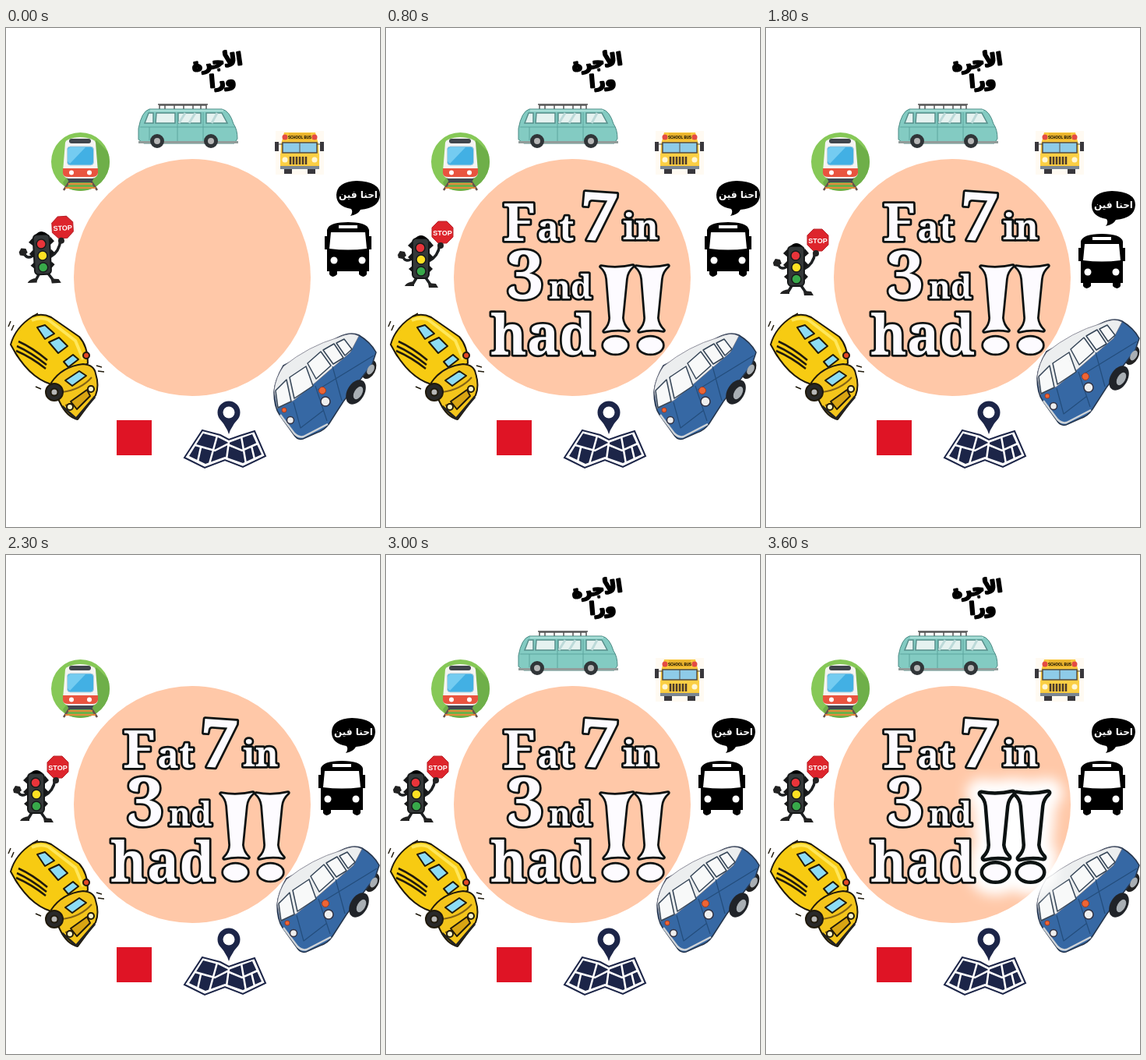
Write an HTML page that moves like this. It is 480 px wide and 640 px high and loops after 5600 ms.

```html
<!DOCTYPE html>
<html lang="en">
<head>
<meta charset="utf-8">
<title>Fat7in 3nd had!!</title>
<style>
html, body { margin: 0; width: 100%; height: 100%; overflow: hidden; background: #fff; }
svg { display: block; width: 100vw; height: 100vh; }
#title { --ink: #fdfbff; fill: var(--ink); stroke: #0c1212; stroke-width: 5.5; stroke-linejoin: round;
  paint-order: stroke; font-family: "Noto Serif", "Liberation Serif", serif; font-weight: 900; }
.arabic { font-family: "DejaVu Sans", sans-serif; font-weight: 700; text-anchor: middle; direction: rtl; }
.sans { font-family: "Liberation Sans", sans-serif; font-weight: 700; text-anchor: middle; }
</style>
</head>
<body>
<svg viewBox="0 0 480 640">
<defs>
  <filter id="blur" x="-80%" y="-50%" width="260%" height="200%"><feGaussianBlur stdDeviation="8"/></filter>
  <clipPath id="disc"><circle cx="95.500" cy="171.500" r="37.500"/></clipPath>
  <path id="bang" d="M276 306Q296 310 317 305Q309 312 308 322L303 372Q304 381 311 388Q296 385 280 389Q288 381 288 372L284 322Q283 312 276 306ZM279 407a15.500 10.500 0 1 0 31 0a15.500 10.500 0 1 0-31 0"/>
  <g id="bangs"><use href="#bang"/><use href="#bang" x="45"/></g>
</defs>

<circle id="circle" cx="239" cy="320" r="152" fill="#ffc8a8"/>

<g class="item" data-order="0">
  <g class="arabic" stroke="#000" stroke-width="2.400" stroke-linejoin="round">
    <text x="271" y="51" font-size="21.500" transform="rotate(-8 271 45)">الأجرة</text>
    <text x="278" y="75" font-size="22" transform="rotate(-5 278 70)">ورا</text>
  </g>
  <path d="M197 104v-5h60v5M204 99v5m12-5v5m12-5v5m12-5v5m10-5v5M195 98h64" fill="none" stroke="#555" stroke-width="1.500"/>
  <path d="M170 143V129Q174 107 184 104H277Q287 106 292 123Q297 130 297 142L293 148H177Z" fill="#83cbc2" stroke="#4b8983"/>
  <path d="M185 106H279" stroke="#a9ded7" stroke-width="2.500"/>
  <path d="M178 122l5-13h6v13ZM193 109h24v13h-25ZM221 109h29v13h-29ZM257 109h20l7 13h-27Z" fill="#e5f2f0" stroke="#578f8b" stroke-width="1.500"/>
  <path d="M230 109l-8 13m21-13-8 13m36-13-7 13" stroke="#bddad9" stroke-width="3"/>
  <path d="M172 127H294M220 108v38m33-38v38M184 127v17" stroke="#5ca59e" fill="none"/>
  <path d="M170 145H298v3H170Z" fill="#929c9a"/>
  <g fill="#b6b6b6" stroke="#303538" stroke-width="5"><circle cx="194" cy="145" r="6.500"/><circle cx="263" cy="145" r="6.500"/></g>
</g>

<g class="item" data-order="1">
  <path d="M346 132h62v56h-62Z" fill="#fffaf2"/>
  <path d="M353 149l4-15h40l4 15 1 28h-50Z" fill="#f9c83c"/>
  <path d="M363 135h28v9h-28Z" fill="#e9b32c"/>
  <text class="sans" x="377" y="142" font-size="4.500">SCHOOL BUS</text>
  <path d="M355 147h44v13h-44Z" fill="#8ecbe8" stroke="#554c42" stroke-width="1.500"/>
  <path d="M377 147v13" stroke="#554c42"/>
  <path d="M345 146h5v12h-5Zm58 0h5v12h-5ZM357 180h10v7h-10Zm30 0h10v7h-10Z" fill="#38373c"/>
  <path d="M350 149h5m44 0h5" stroke="#444"/>
  <path d="M352 161h50v15h-50Z" fill="#fbcf45"/>
  <path d="M365 165v10m4-10v10m4-10v10m4-10v10m4-10v10m4-10v10" stroke="#4b3a2c" stroke-width="2.500"/>
  <path d="M352 177h50v4h-50Z" fill="#7b8692"/>
  <g fill="#e44b43"><circle cx="358" cy="140" r="3.500"/><circle cx="396" cy="140" r="3.500"/></g>
  <g fill="#fff7d5"><circle cx="358" cy="169" r="3.500"/><circle cx="396" cy="169" r="3.500"/></g>
</g>

<g class="item" data-order="2">
  <g id="bubble">
    <path d="M424 214Q425 197 450 196Q480 197 480 214Q479 231 455 233Q452 239 442 241Q446 236 443 232Q424 229 424 214"/>
    <text class="arabic" x="452" y="218" font-size="12" fill="#fff">احنا فين</text>
  </g>
  <g id="bus">
    <path d="M412 259Q414 249 439 249Q464 249 466 259V312H463V316Q459 322 453 316V312H425V316Q419 322 415 316V312H412ZM409 267h4v17h-4Zm56 0h4v17h-4Z"/>
    <path d="M427 253h24v4h-24ZM417 262h44l2 21Q439 286 415 283Z" fill="#fff"/>
    <g fill="#fff"><circle cx="421" cy="298" r="4.500"/><circle cx="457" cy="298" r="4.500"/></g>
  </g>
</g>

<g class="item" data-order="3"><g id="camper" stroke-linejoin="round">
  <ellipse cx="470" cy="420" rx="8" ry="13" fill="#222" transform="rotate(28 470 420)"/>
  <path d="M348 449Q349 434 360 415L430 379Q446 371 457 376Q472 385 479 398L474 413 437 461 419 489Q413 498 403 501L385 509Q378 511 373 503L355 478Q348 468 348 449Z" fill="#3668a4" stroke="#26364d" stroke-width="1.500"/>
  <path d="M348 447Q350 430 360 416Q392 390 430 379Q447 371 457 377L446 398 402 436 373 460 352 470Z" fill="#eceeef" stroke="#667" stroke-width=".7"/>
  <path d="M350 447l14-14 6 28-17 8ZM368 430l21-14 9 25-24 16ZM391 412l17-15 13 18-19 17ZM411 395l14-8 12 18-13 8ZM428 386l10-5 10 13-9 8Z" fill="#f8f9f9" stroke="#354557" stroke-width="1.500"/>
  <path d="M401 441l15 45M423 416l12 44M404 446L476 402M373 462l9 33 30-23" fill="none" stroke="#234d7c" stroke-width="1.200"/>
  <path d="M356 478l18 24q6 6 12 4l31-16" fill="none" stroke="#d0d4d8" stroke-width="2.500"/>
  <ellipse cx="453" cy="449" rx="11" ry="17" fill="#202328" transform="rotate(30 453 449)"/>
  <ellipse cx="456" cy="450" rx="5" ry="9" fill="#a9afb4" transform="rotate(30 456 450)"/>
  <ellipse cx="472" cy="420" rx="4" ry="7" fill="#a9afb4" transform="rotate(30 472 420)"/>
  <g fill="#eee" stroke="#334" stroke-width="1.500"><circle cx="414" cy="461" r="6"/><circle cx="369" cy="485" r="4.500"/></g>
  <g fill="#ed6534" stroke="#a13a23"><circle cx="410" cy="447" r="4.500"/><circle cx="361" cy="472" r="3"/></g>
</g></g>

<g class="item" data-order="4">
  <path d="M252 516L275 522 286 528 300 523 319 517 333 549 304 563 281 554 255 564 229 551Z" fill="#fff" stroke="#1c2548" stroke-width="2"/>
  <path d="M253 520L272 525 286 532 302 526 316 521 328 547 304 558 281 550 256 559 235 549Z" fill="#1c2548"/>
  <path d="M243 535l25 7 16-8 19 8 20-9M271 523l-10 36M286 531l-3 22M302 524l6 35M250 538l-4 18M315 536l4 17" fill="none" stroke="#fff" stroke-width="2.500"/>
  <path d="M286 524Q283 513 275 504A15.500 15.500 0 1 1 297 504Q289 513 286 524" fill="#1c2548" stroke="#fff" stroke-width="2"/>
  <circle cx="286" cy="493" r="7.500" fill="#fff"/>
</g>

<rect class="item" data-order="4" x="142" y="503" width="45" height="45" fill="#df1425"/>

<g class="item" data-order="5" stroke="#201a0c" stroke-width="2" stroke-linejoin="round">
  <path d="M3 383l3-7m1 12 3-7M34 370l7-4M116 433l7 2m-5 5 8 1M38 460l7 3" fill="none" stroke-width="1.500"/>
  <ellipse cx="21" cy="416" rx="8" ry="11" fill="#292929" transform="rotate(-40 21 416)"/>
  <path d="M6 406Q12 384 34 370Q46 365 58 371L94 396Q105 408 105 430L82 447 58 457Q28 448 6 406Z" fill="#f7cb12"/>
  <path d="M33 375Q44 370 54 374L89 401 99 425" fill="none" stroke="#ffe75b" stroke-width="4"/>
  <path d="M40 384l10-3 12 11-12 7ZM55 403l13-6 11 11-12 9ZM74 428l12-9 7 6-13 10Z" fill="#8ddcf5"/>
  <path d="M16 402q18 8 37 24M14 408q18 8 38 24M13 414q19 8 38 23" fill="none" stroke-width="2.500"/>
  <path d="M58 455Q72 434 99 431Q113 432 115 443Q120 459 115 471L92 502Q78 499 69 480Z" fill="#f4c51b"/>
  <path d="M76 452l18-12 9 6-18 13Z" fill="#8ddcf5"/>
  <path d="M72 467q24-3 38-19M76 484q18-4 36-25" fill="none" stroke="#846315"/>
  <path d="M83 479l21-15 4 8-17 17Z" fill="#d9a513"/>
  <path d="M72 485l18 16 24-28" fill="none" stroke="#222" stroke-width="3"/>
  <circle cx="103" cy="420" r="4" fill="#e54925"/>
  <circle cx="62" cy="467" r="11" fill="#292929"/><circle cx="62" cy="467" r="4.500" fill="#b7b7b7"/>
  <g fill="#fff7c9"><circle cx="82" cy="486" r="4"/><circle cx="109" cy="463" r="4"/></g>
</g>

<g class="item" data-order="6"><g id="signal">
  <path d="M36 294Q25 303 21 292M55 299Q67 293 69 278M40 319l-6 10M50 319l7 10" fill="none" stroke="#1d2022" stroke-width="3.500"/>
  <path d="M15 291l3-5 6 1 2 5-5 4-5-1ZM36 325v6H24q2-5 12-6Zm18 2 10 1 3 5H55Z" fill="#222"/>
  <path d="M33 274l-5 5 7 6Zm0 15-5 5 7 6Zm1 16-5 4 7 6ZM56 273l5 6-7 6Zm0 16 5 5-7 6Zm0 16 4 4-6 6Z" fill="#171819"/>
  <rect x="34" y="270" width="21" height="51" rx="5" fill="#343839" stroke="#151718" stroke-width="2"/>
  <path d="M37 270q8-8 16 0Z"/>
  <g stroke="#171a1a" stroke-width="1.500">
    <circle cx="44" cy="282" r="6" fill="#e8343a"/><circle cx="45" cy="297" r="6" fill="#ffe123"/><circle cx="45" cy="312" r="6" fill="#38a94a"/>
  </g>
  <path d="M67 248h11l8 8v12l-8 8H67l-8-8v-12Z" fill="#dd252c" stroke="#b7242b"/>
  <text class="sans" x="72.500" y="266" font-size="9" fill="#fff">STOP</text>
  <circle cx="70" cy="279" r="4" fill="#222"/>
</g></g>

<g class="item" data-order="7">
  <circle cx="95.500" cy="171.500" r="37.500" fill="#86c857"/>
  <path d="M116 144l40 40v40H86l-13-26Z" fill="#6eaf49" clip-path="url(#disc)"/>
  <path d="M82 196l-8 12m35-12 8 12" stroke="#68514b" stroke-width="2.500"/>
  <path d="M80 200h31m-35 5h39" stroke="#e58b3c" stroke-width="2"/>
  <path d="M77 190h37l-4 8H81Z" fill="#424951"/>
  <path d="M73 184L76 147Q78 141 95 140Q113 141 115 147L118 184Q118 192 111 193H80Q73 192 73 184" fill="#f5f4f2"/>
  <rect x="81" y="142" width="28" height="6" rx="3" fill="#41464c"/>
  <rect x="78.500" y="152" width="34" height="24" rx="4" fill="#42b0e4" stroke="#b9d3df"/>
  <path d="M82 153h20l-20 21-3-3v-15Z" fill="#74ccf1"/>
  <path d="M73 180h45v6q-1 5-7 5H80q-7 0-7-5Z" fill="#e9543f"/>
  <g fill="#fff"><circle cx="84" cy="185.500" r="3"/><circle cx="107" cy="185.500" r="3"/></g>
</g>

<g id="title">
  <use id="glow" href="#bangs" fill="#fff" stroke="#fff" stroke-width="38" filter="url(#blur)"/>
  <g class="line" id="first">
    <text x="150" y="273" font-size="67">F</text>
    <text x="194" y="273" font-size="47">at</text>
    <text x="249" y="273" font-size="86" transform="rotate(4 278 245)">7</text>
    <text x="304" y="271" font-size="45">in</text>
  </g>
  <g class="line">
    <text x="155" y="347" font-size="86">3</text>
    <text x="209" y="347" font-size="42">nd</text>
  </g>
  <text class="line" x="134" y="419" font-size="70">had</text>
  <use class="line" id="marks" href="#bangs"/>
</g>
</svg>
<script>
const $ = id => document.getElementById(id);
const items = [...document.querySelectorAll(".item")];
const lines = [...document.querySelectorAll(".line")];
const show = (el, on) => { el.style.display = on ? "" : "none"; };
const place = (id, value) => $(id).setAttribute("transform", value);
const start = performance.now();

function draw(now) {
  const t = Math.max(0, now - start) % 5600;
  const bare = t >= 1300 && t < 1800;
  const moved = t >= 1300;
  const glowing = t >= 3600;

  lines.forEach((line, i) => show(line, t >= 200 * (i + 1)));
  show($("circle"), !bare);
  $("title").style.setProperty("--ink", bare ? "#ffc8a8" : "#fdfbff");
  place("first", `translate(${bare ? -3 : 0} 0)`);

  const leaning = t < 400 || (t >= 600 && t < 800);
  place("signal", t >= 1800 ? "translate(-6 10)" : leaning ? "translate(2 -5) rotate(-3 45 298)" : "");
  place("bubble", moved ? "translate(-6 13)" : "");
  place("bus", moved ? "translate(-8 15)" : "");
  place("camper", moved ? "" : "translate(-4 18)");

  // Icons leave clockwise, then all of them blink once.
  for (const el of items) {
    const left = t >= 2200 + 100 * el.dataset.order && t < 3000;
    show(el, !left && !(t >= 3200 && t < 3400));
  }
  show($("glow"), glowing);
  $("marks").style.strokeWidth = glowing ? 9 : 5.5;
  requestAnimationFrame(draw);
}
draw(start);
</script>
</body>
</html>
```
